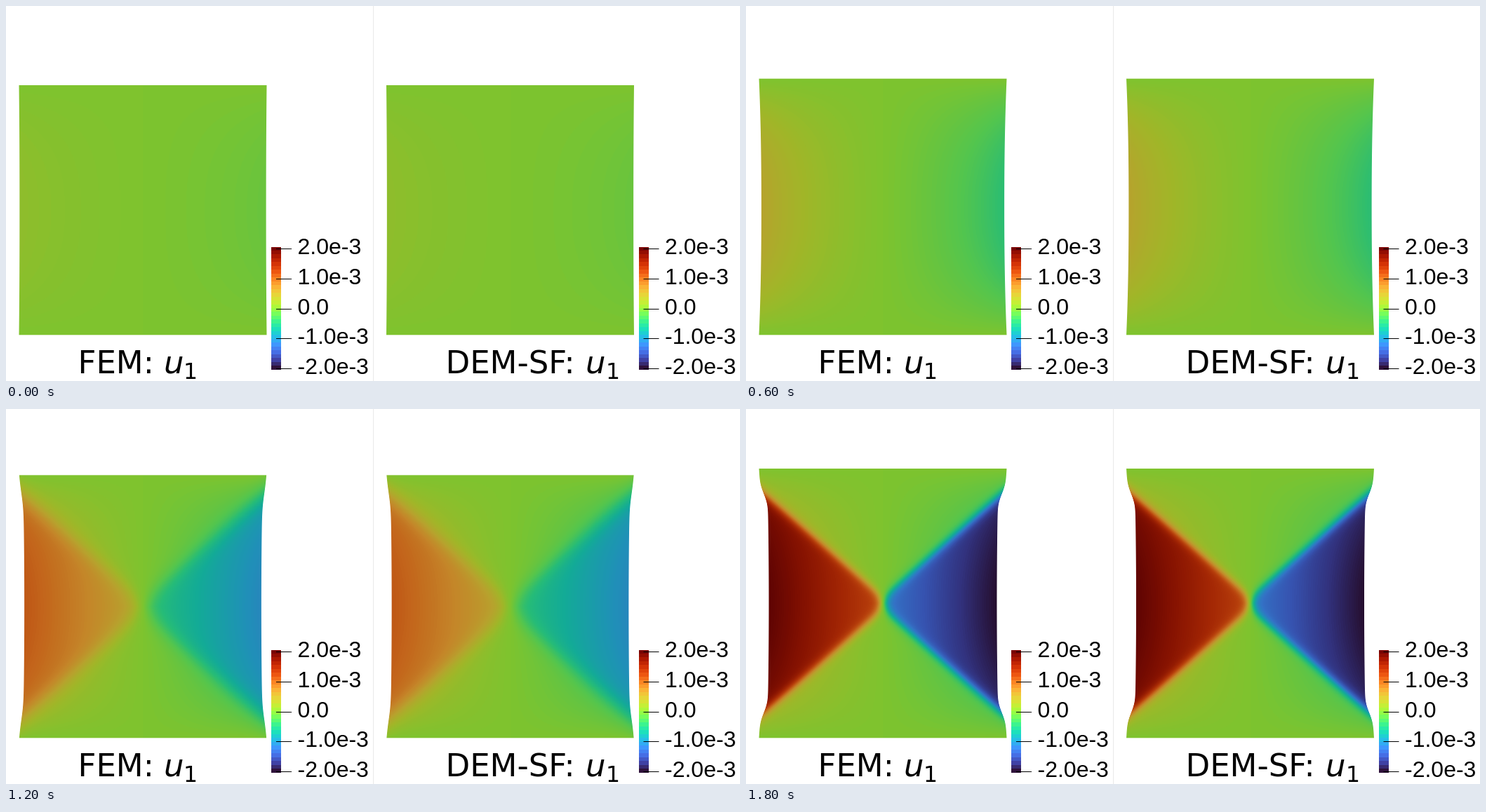
Write an HTML page with a canvas that moves like this. It is 1046x535 px and loops after 2000 ms.

```html
<!DOCTYPE html>
<html lang="en">
<head>
<meta charset="utf-8">
<title>Displacement field</title>
<style>
  html, body { margin: 0; width: 100%; height: 100%; overflow: hidden; background: #fff; }
  canvas, svg { position: absolute; left: 0; top: 0; width: 1046px; height: 535px; }
  .label { font: 32px "Liberation Sans", Arial, sans-serif; }
  .title { font: 45px "DejaVu Sans", sans-serif; }
  .var { font-style: oblique; }
  .sub { font-size: 31.5px; }
</style>
</head>
<body>
<canvas id="field" width="1046" height="535"></canvas>
<svg id="overlay" viewBox="0 0 1046 535">
  <rect x="523" width="1" height="535" fill="#e9e9e9"/>
  <g class="title">
    <text x="102.5" y="523.5">FEM:</text>
    <text class="var" x="225" y="523.5">u</text>
    <text class="sub" x="253" y="531.5">1</text>
    <text x="626.5" y="523.5">DEM-SF:</text>
    <text class="var" x="826" y="523.5">u</text>
    <text class="sub" x="855" y="531.5">1</text>
  </g>
</svg>
<script>
const W = 1046, H = 535, HALF = 176.5, BOTTOM = 469.3;
const STEP_MS = 200, STEPS = 10, PX_PER_UNIT = 7, SHADE = 0.775;
const centers = [195, 718.5];

// Colour ramp from -2 to 2
const ramp = ('30123b 4040a2 466be3 4293ff 28bbec 18dcc3 31f299 6bfe64 a2fc3c ' +
  'cfeb34 edd03a fdad35 fb8022 ec520f d23105 ac1701 7a0403')
  .split(' ').map(h => [0, 2, 4].map(i => parseInt(h.slice(i, i + 2), 16)));

const clamp = (v, lo, hi) => Math.min(hi, Math.max(lo, v));

function colour(t) {
  const p = clamp(t, 0, 1) * 16;
  const i = Math.min(15, Math.floor(p));
  return ramp[i].map((c, n) => c + (ramp[i + 1][n] - c) * (p - i));
}

const palette = Array.from({ length: 256 }, (_, i) =>
  colour(i / 255).map(c => c * SHADE));

// Late steps: [rigid shift of the side wedge, strain in it, band width]
const wedges = {
  5: [0.2, 0.6, 30],
  6: [0.46, 0.66, 20],
  7: [0.73, 0.75, 14],
  8: [1.0, 0.8, 11.5],
  9: [1.22, 0.85, 10]
};

// Inward displacement at distance dx, dy from the centre
function inward(step, dx, dy, h) {
  const s = dx / HALF, v = Math.min(1, dy / h);
  const load = Math.min(0.125 * (step + 1), 0.63);
  const soft = load * Math.sinh(1.57 * s) / 2.3 * (1 - Math.pow(v, 2.3));
  const wedge = wedges[step];
  if (!wedge) return soft;
  const [shift, strain, width] = wedge;
  const q = 0.87 * dx + 8 - dy;
  const mix = 0.5 * (1 + Math.tanh(q / width));
  const hard = shift * Math.tanh(dx / (width * 0.8)) + strain * s * (1 - 0.45 * v * v);
  return soft + (hard - soft) * mix;
}

const ctx = document.getElementById('field').getContext('2d');
const cache = [];

function render(step) {
  const img = ctx.createImageData(W, H);
  const top = 113 - 3.11 * step;
  const cy = (top + BOTTOM) / 2, h = (BOTTOM - top) / 2;
  for (const cx of centers) {
    for (let y = Math.floor(top); y <= BOTTOM; y++) {
      const dy = Math.abs(y + 0.5 - cy);
      const rowAlpha = clamp(h - dy + 0.5, 0, 1);
      for (let x = Math.floor(cx - HALF) - 1; x <= cx + HALF + 1; x++) {
        const side = x + 0.5 - cx, dx = Math.abs(side);
        const u = inward(step, dx, dy, h);
        const alpha = clamp(HALF - dx - PX_PER_UNIT * u + 0.5, 0, 1) * rowAlpha;
        if (!alpha) continue;
        const t = 0.5 - Math.sign(side) * u / 4;
        const c = palette[Math.round(clamp(t, 0, 1) * 255)];
        const o = (y * W + x) * 4;
        img.data[o] = c[0];
        img.data[o + 1] = c[1];
        img.data[o + 2] = c[2];
        img.data[o + 3] = alpha * 255;
      }
    }
  }
  return img;
}

const overlay = document.getElementById('overlay');

function add(tag, attrs, text = '') {
  const el = document.createElementNS('http://www.w3.org/2000/svg', tag);
  for (const k in attrs) el.setAttribute(k, attrs[k]);
  el.textContent = text;
  overlay.appendChild(el);
}

function legend(x) {
  const bands = 32, top = 343.5, size = 175 / bands;
  for (let i = 0; i < bands; i++) {
    const rgb = colour(1 - i / (bands - 1)).map(Math.round);
    add('rect', { x, y: top + i * size, width: 14, height: size,
      fill: `rgb(${rgb})`, 'shape-rendering': 'crispEdges' });
  }
  ['2.0e-3', '1.0e-3', '0.0', '-1.0e-3', '-2.0e-3'].forEach((label, i) => {
    add('rect', { x: x + 7, y: Math.round(346 + i * 42.8), width: 22, height: 1 });
    add('text', { class: 'label', x: x + 37.5, y: 354 + i * 42.75 }, label);
  });
}

legend(378);
legend(901.5);

let shown = -1;
function frame() {
  const step = Math.floor(performance.now() / STEP_MS) % STEPS;
  if (step !== shown) {
    cache[step] = cache[step] || render(step);
    ctx.putImageData(cache[step], 0, 0);
    shown = step;
  }
  requestAnimationFrame(frame);
}
frame();
</script>
</body>
</html>
```
